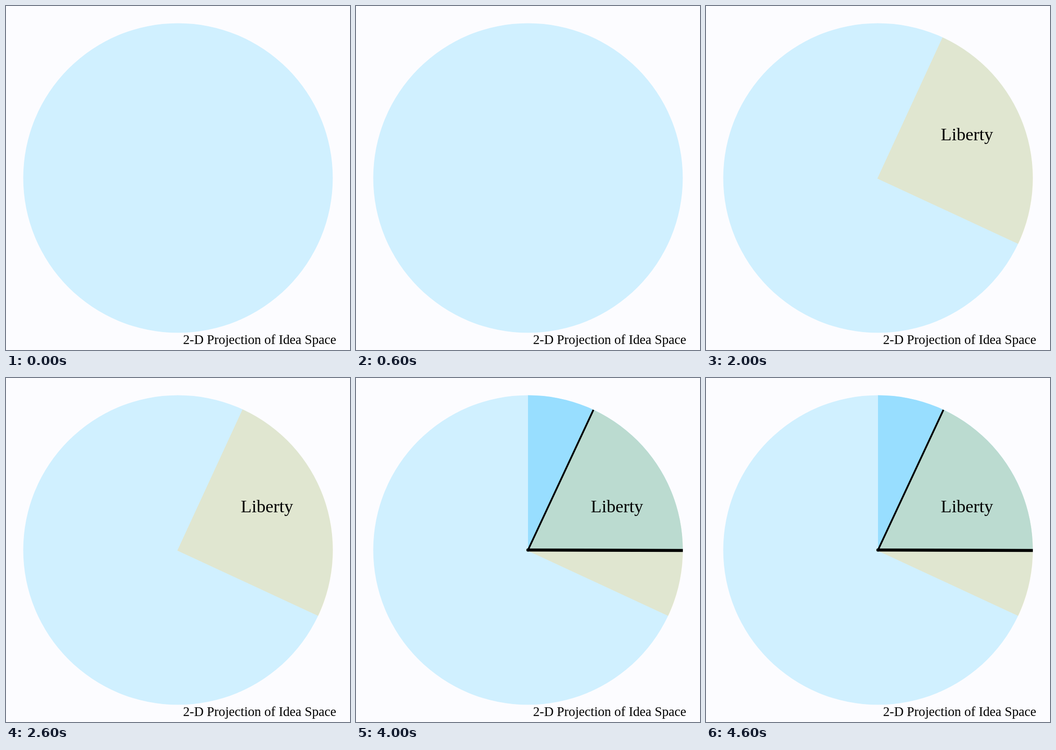
An HTML page that plays this animation: 748 px wide and 748 px high, repeating every 5000 ms.

```html
<!DOCTYPE html>
<html lang="en">
<head>
<meta charset="utf-8">
<title>2-D Projection of Idea Space</title>
<style>
  html, body { margin: 0; width: 100%; height: 100%; overflow: hidden; background: #fcfcff; }
  svg { display: block; width: 100%; height: 100%; }
  text { font-family: "Liberation Serif", "Times New Roman", serif; }
  [data-steps] { visibility: hidden; }
</style>
</head>
<body>
<svg viewBox="0 0 748 748">
  <circle cx="374" cy="374" r="336.5" fill="#d0f0ff"/>
  <path data-steps="134" d="M374 374V37.5A336.5 336.5 0 0 1 710.5 374Z" fill="#98deff"/>
  <path data-steps="234" d="M372.5 375.3L514.3 68.3A336.5 336.5 0 0 1 678.8 517.3Z" fill="rgb(255 210 117 / .34)"/>
  <g data-steps="4" stroke="#000">
    <path d="M374 374L516.3 69.3" stroke-width="3.8"/>
    <path d="M374 374L710.7 375" stroke-width="6.6"/>
    <circle cx="374" cy="374" r="3.6" stroke="none"/>
  </g>
  <text data-steps="1234" x="510.5" y="292" font-size="38.7">Liberty</text>
  <text x="385" y="735" font-size="28.7">2-D Projection of Idea Space</text>
</svg>
<script>
  const STEP = 1000, COUNT = 5;
  const parts = document.querySelectorAll("[data-steps]");
  const start = performance.now();

  function draw() {
    const step = Math.floor((performance.now() - start) / STEP) % COUNT;
    for (const part of parts) {
      part.style.visibility = part.dataset.steps.includes(step) ? "visible" : "hidden";
    }
    requestAnimationFrame(draw);
  }
  draw();
</script>
</body>
</html>
```
